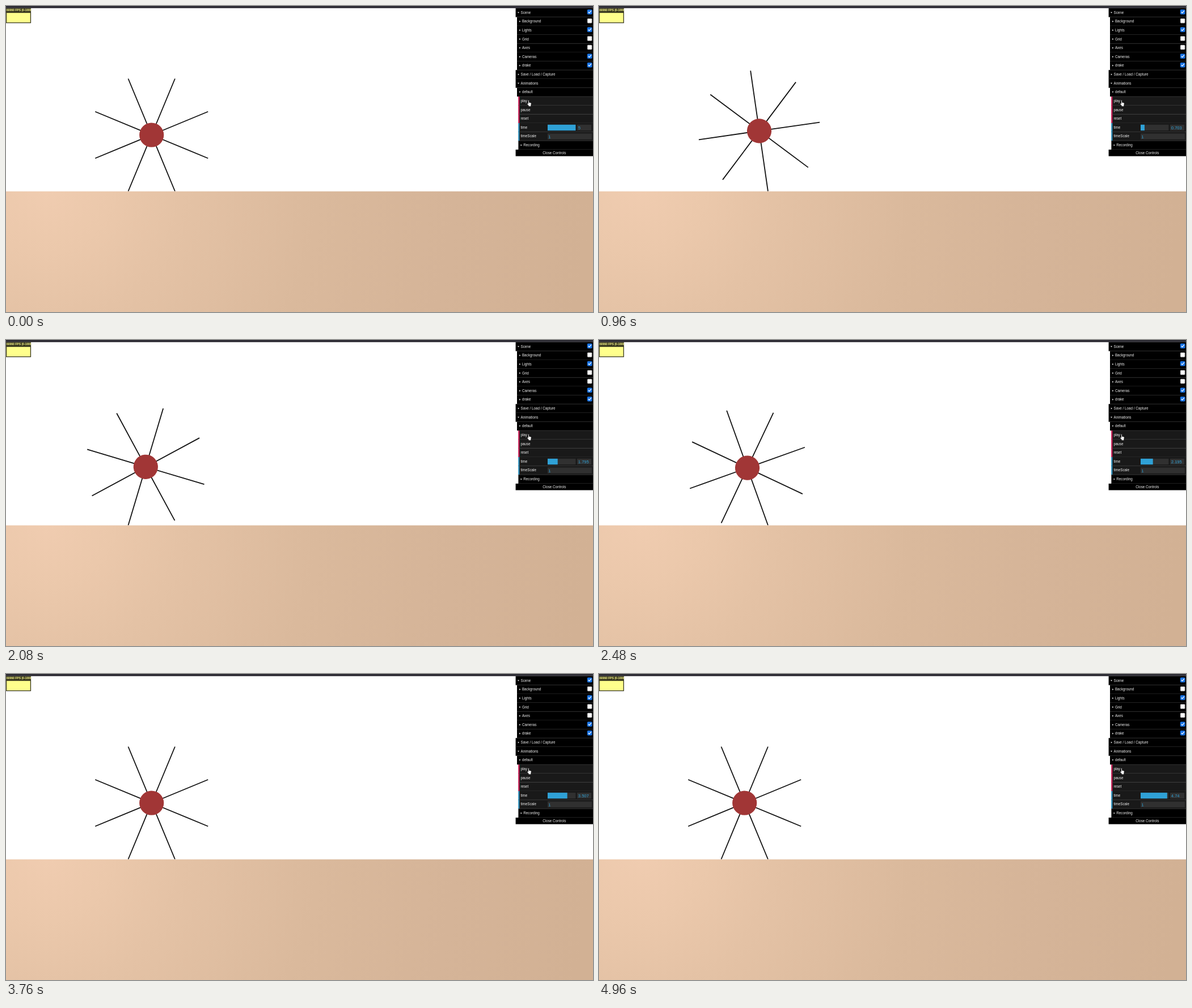
An HTML page for the animation above (5.04 s loop, 1035 by 541 pixels).

```html
<!DOCTYPE html>
<html lang="en">
<head>
<meta charset="utf-8">
<title>Rimless wheel</title>
<style>
  html, body { margin: 0; width: 100%; height: 100%; overflow: hidden; background: #fff; }
  svg { display: block; width: 100vw; height: 100vh; }
  text { font-family: "Liberation Sans", Arial, sans-serif; font-size: 6.27px; fill: #eee; white-space: pre; }
  .value { font-size: 7.6px; fill: #2fa1d6; }
</style>
</head>
<body>
<svg id="stage" viewBox="0 0 1035 541" preserveAspectRatio="none">
  <defs>
    <radialGradient id="sand" gradientUnits="userSpaceOnUse" cx="70" cy="322" r="960">
      <stop offset="0" stop-color="#f0ccb0"/>
      <stop offset=".12" stop-color="#ebc8ab"/>
      <stop offset=".25" stop-color="#e4c2a5"/>
      <stop offset=".5" stop-color="#dab99c"/>
      <stop offset=".75" stop-color="#d5b498"/>
      <stop offset="1" stop-color="#d2b194"/>
    </radialGradient>
    <clipPath id="statsClip"><rect y="3.5" width="44.3" height="27"/></clipPath>
  </defs>
  <g id="wheel"></g>
  <rect y="327.7" width="1035" height="214" fill="url(#sand)"/>
  <rect width="1035" height="3.8" fill="#2d2c34"/>
  <g clip-path="url(#statsClip)">
    <rect y="3.5" width="44.3" height="27" fill="#38371f"/>
    <rect x="1.2" y="12.2" width="41.6" height="16.8" fill="#ffff8c"/>
    <text x="1" y="8.9" style="font-size:5px;font-weight:bold;fill:#ffff8c">60060 FPS (0-1000)</text>
  </g>
  <g id="panel"></g>
  <path id="cursor" transform="translate(918.6 166.2)" fill="#fff" stroke="#111" stroke-width=".6" stroke-linejoin="round"
    d="M2 1C2-.2 3.5-.2 3.5 1V4.3L6.4 4.8Q7.7 5.1 7.6 6.4L7 9.3V11.4H2.8V10L.3 7.1Q-.2 6 .9 6L2 6.8Z"/>
</svg>
<script>
const LOOP = 5040, FRAME = 80, START = 320;
const ALPHA = Math.PI / 8, GRAVITY = 9.81, START_SPEED = 1.1;
const LEG = 107.7, GROUND_Y = 327.5, FIRST_FOOT = 215.5;
const STRIDE = 2 * LEG * Math.sin(ALPHA);
const ROW = 15.63, RIGHT = 1035;

// Playback clock: [wall ms, simulated seconds]
const CLOCK = [[320, .063], [960, .703], [1600, 1.332], [2080, 1.795],
               [2880, 2.595], [3760, 3.507], [4960, 4.74]];

const panel = document.getElementById('panel');
const wheel = document.getElementById('wheel');

function add(parent, tag, attrs, content = '') {
  const node = document.createElementNS('http://www.w3.org/2000/svg', tag);
  for (const key in attrs) node.setAttribute(key, attrs[key]);
  node.textContent = content;
  return parent.appendChild(node);
}
const box = (x, y, width, height, fill) => add(panel, 'rect', { x, y, width, height, fill });
const label = (x, y, content, extra) => add(panel, 'text', { x, y, ...extra }, content);

function checkbox(y, checked) {
  add(panel, 'rect', { x: 1025.1, y: y - 4, width: 8, height: 8, rx: 1.2,
    fill: checked ? '#1a76e8' : '#fff', stroke: checked ? '#1a76e8' : '#777', 'stroke-width': .6 });
  if (checked) add(panel, 'path', { d: `M1026.7 ${y}l1.8 1.9 3.4-4`, fill: 'none', stroke: '#fff', 'stroke-width': 1.2 });
}

function folder(row, depth, name, open, checked) {
  const x = 898.6 + depth * 2.4, mid = 11.6 + row * ROW, top = mid - ROW / 2;
  box(x, top, RIGHT - x, ROW, '#000');
  box(x, top + ROW - .6, RIGHT - x, .6, '#242424');
  const d = open ? `M${x + 3.4} ${mid - .9}h3l-1.5 2z` : `M${x + 4.2} ${mid - 1.6}v3l2-1.5z`;
  add(panel, 'path', { d, fill: '#fff' });
  label(x + 8.9, mid + 2.1, name);
  if (checked !== undefined) checkbox(mid - 1.1, checked);
}

function control(row, name, color) {
  const x = 903.4, top = 11.6 + (row - .5) * ROW;
  box(x, top, RIGHT - x, ROW, '#191919');
  box(x, top + ROW - .6, RIGHT - x, .6, '#2c2c2c');
  box(x, top, 1.9, ROW, color);
  label(907.4, top + ROW / 2 + 2, name);
}

folder(0, 0, 'Scene', true, true);
[['Background', false], ['Lights', true], ['Grid', false], ['Axes', false], ['Cameras', true], ['drake', true]]
  .forEach(([name, checked], i) => folder(i + 1, 1, name, false, checked));
folder(7, 0, 'Save / Load / Capture', false);
folder(8, 0, 'Animations', true);
folder(9, 1, 'default', true);
['play', 'pause', 'reset'].forEach((name, i) => control(10 + i, name, '#e61d5f'));
control(13, 'time', '#2fa1d6');
control(14, 'timeScale', '#2fa1d6');
folder(15, 2, 'Recording', false);
box(898.6, 253.9, RIGHT - 898.6, 11.6, '#000');
label(966.8, 261.7, 'Close Controls', { 'text-anchor': 'middle' });

box(955, 209.8, 49.4, 10.4, '#303030');
box(1007, 209.8, 25.2, 10.4, '#303030');
box(955, 225.4, 78, 10.4, '#303030');
const slider = box(955, 209.8, 0, 10.4, '#2fa1d6');
const timeText = label(1008.8, 218.2, '', { class: 'value' });
label(956.3, 233.9, '1', { class: 'value' });

for (let i = 0; i < 8; i++)
  add(wheel, 'line', { y2: LEG, transform: `rotate(${i * 45})`, stroke: '#111', 'stroke-width': 1.8 });
add(wheel, 'circle', { r: 21.6, fill: '#a13636' });

function simTime(ms) {
  if (ms < START) return 5;
  const i = Math.max(1, CLOCK.findIndex(([wall]) => wall >= ms));
  const [[w0, s0], [w1, s1]] = [CLOCK[i - 1], CLOCK[i]];
  return s0 + (s1 - s0) * (ms - w0) / (w1 - w0);
}

// Inverted pendulum about the stance foot; each impact swaps feet and loses speed.
function simulate(seconds) {
  const dt = .0005;
  let angle = 0, speed = START_SPEED, foot = FIRST_FOOT;
  for (let t = 0; t < seconds; t += dt) {
    const midSpeed = speed + GRAVITY * Math.sin(angle) * dt / 2;
    angle += midSpeed * dt;
    speed = midSpeed + GRAVITY * Math.sin(angle) * dt / 2;
    const side = Math.sign(angle);
    if (Math.abs(angle) >= ALPHA && side * speed > 0) {
      foot += side * STRIDE;
      angle = -side * ALPHA;
      speed *= Math.cos(2 * ALPHA);
      if (Math.abs(speed) < .02) break;
    }
  }
  return { angle, foot };
}

function draw(now) {
  const ms = Math.floor(now % LOOP / FRAME) * FRAME;
  const seconds = simTime(ms);
  const { angle, foot } = simulate(seconds);
  const x = foot + LEG * Math.sin(angle), y = GROUND_Y - LEG * Math.cos(angle);
  wheel.setAttribute('transform', `translate(${x} ${y}) rotate(${angle * 180 / Math.PI})`);
  slider.setAttribute('width', 49.4 * seconds / 5);
  timeText.textContent = +seconds.toFixed(3);
}

const begin = performance.now();
function tick() {
  draw(performance.now() - begin);
  requestAnimationFrame(tick);
}
tick();
</script>
</body>
</html>
```
